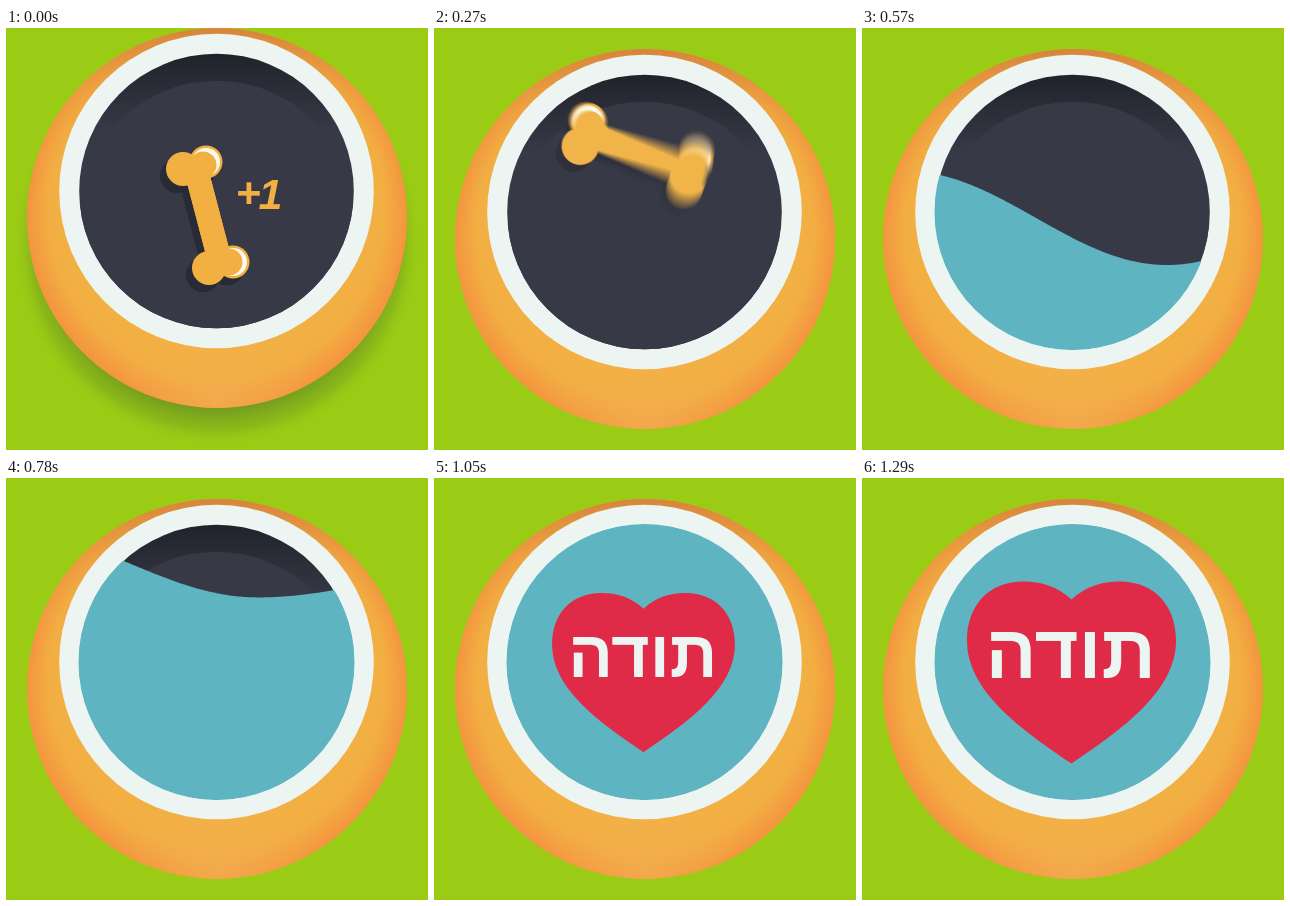
An HTML page with a canvas for the animation above (5040 ms loop, 422 px wide and 422 px high).

```html
<!DOCTYPE html>
<html lang="he">
<head>
<meta charset="utf-8">
<style>
html, body { margin: 0; width: 100%; height: 100%; overflow: hidden; background: #9acb15; }
canvas { display: block; }
</style>
</head>
<body>
<canvas id="stage" width="422" height="422"></canvas>
<script>
const SIZE = 422, LOOP = 5040, STEP = 30, TAU = Math.PI * 2;
const ORANGE = '#f3b042', WHITE = '#edf5f2', TEAL = '#5eb4c1', RED = '#e02b48', DARK = '#373947';
const stage = document.getElementById('stage').getContext('2d');
const layer = () => Object.assign(document.createElement('canvas'), { width: SIZE, height: SIZE }).getContext('2d');
const sample = layer(), blur = layer();

// Piecewise linear value from [time, value] pairs
function track(t, keys) {
  if (t <= keys[0][0]) return keys[0][1];
  for (let i = 1; i < keys.length; i++) {
    const [a, u] = keys[i - 1], [b, v] = keys[i];
    if (t <= b) return u + (v - u) * (t - a) / (b - a);
  }
  return keys[keys.length - 1][1];
}

function disc(c, x, y, r, fill) {
  c.beginPath();
  c.arc(x, y, r, 0, TAU);
  c.fillStyle = fill;
  c.fill();
}

function blend(gradient, ...stops) {
  for (const [at, color] of stops) gradient.addColorStop(at, color);
  return gradient;
}

// Text sized by its ink width and centred on its ink box
function label(text, font, x, y, width, color) {
  const c = stage;
  const setFont = size => { c.font = font.replace('SIZE', size + 'px'); return c.measureText(text); };
  c.textAlign = 'left';
  c.direction = 'ltr';
  const ref = setFont(100);
  const m = setFont(100 * width / (ref.actualBoundingBoxRight + ref.actualBoundingBoxLeft));
  c.fillStyle = color;
  c.fillText(text, x + (m.actualBoundingBoxLeft - m.actualBoundingBoxRight) / 2,
    y + (m.actualBoundingBoxAscent - m.actualBoundingBoxDescent) / 2);
}

function drawButton(y, shade) {
  const c = stage;
  if (shade > 0) {
    c.globalAlpha = shade;
    disc(c, 211, y + 24, 204, blend(c.createRadialGradient(211, y + 24, 166, 211, y + 24, 204),
      [0, 'rgba(112,150,32,.9)'], [.55, 'rgba(125,168,28,.55)'], [1, 'rgba(154,203,21,0)']));
    c.globalAlpha = 1;
  }
  disc(c, 211, y, 190, blend(c.createRadialGradient(211, y - 16, 148, 211, y, 190),
    [0, '#f2b043'], [.5, '#f2ae42'], [1, '#f4943f']));
  disc(c, 211, y, 190, blend(c.createRadialGradient(211, y + 185, 0, 211, y + 185, 115),
    [0, 'rgba(242,176,82,.7)'], [1, 'rgba(242,176,72,0)']));
  disc(c, 211, y, 190, blend(c.createLinearGradient(0, y - 190, 0, y - 40),
    [0, 'rgba(212,132,58,.95)'], [.4, 'rgba(232,158,62,.5)'], [1, 'rgba(242,174,66,0)']));
  disc(c, 210.5, y - 27, 157.3, WHITE);
  disc(c, 210.5, y - 27, 137.3, blend(c.createLinearGradient(0, y - 164, 0, y - 85),
    [0, '#20232a'], [.45, '#2b2e38'], [1, DARK]));
  c.save();
  c.beginPath();
  c.arc(210.5, y - 27, 137.3, 0, TAU);
  c.clip();
  disc(c, 210.5, y, 137.3, DARK);
  c.restore();
}

function boneShape(c, body, shine) {
  c.strokeStyle = body;
  c.lineWidth = 24;
  c.beginPath();
  c.moveTo(-11, -42);
  c.lineTo(11, 42);
  c.stroke();
  for (const [x, y, dx, dy] of [[-2, -53.5, -3, 3], [25, 46.5, -4, 0]]) {
    disc(c, x, y, 16.5, body);
    if (shine) {
      disc(c, x, y, 14, '#fffaf0');
      disc(c, x + dx, y + dy, 13.5, body);
    }
  }
  disc(c, -25, -46.5, 17, body);
  disc(c, 1, 52.5, 17, body);
  if (shine) {
    c.beginPath();
    c.moveTo(-11, -42);
    c.lineTo(11, 42);
    c.stroke();
  }
}

function drawBone(t) {
  const shots = t ? 12 : 1, shutter = 18;
  blur.clearRect(0, 0, SIZE, SIZE);
  blur.globalCompositeOperation = 'lighter';
  blur.globalAlpha = 1 / shots;
  for (let i = 0; i < shots; i++) {
    const at = t + shutter * ((i + .5) / shots - .5);
    const e = t ? Math.pow(at / 270, 2.4) : 0;
    sample.clearRect(0, 0, SIZE, SIZE);
    for (const [dx, dy, color, shine] of [[-6, 7, '#282a35', false], [0, 0, ORANGE, true]]) {
      sample.save();
      sample.translate(202 + 2 * e + dx, 187.5 - 63.5 * e + dy);
      sample.rotate(-56 * e * Math.PI / 180);
      sample.scale(1 + .1 * e, 1 + .1 * e);
      boneShape(sample, color, shine);
      sample.restore();
    }
    blur.drawImage(sample.canvas, 0, 0);
  }
  stage.drawImage(blur.canvas, 0, 0);
}

function drawScore(t) {
  const s = track(t, [[0, 1], [120, 1.13], [240, 0]]);
  if (s <= 0) return;
  const font = 'italic bold SIZE "Liberation Sans", sans-serif';
  stage.save();
  stage.translate(253, 166);
  stage.scale(s, s);
  label('+', font, -10, -1, 22, ORANGE);
  label('1', font, 10.5, 0, 21.5, ORANGE);
  stage.restore();
}

function drawWater(t) {
  const c = stage, x0 = 305 - .252 * (t - 570), y0 = 237 - .56 * (t - 570);
  const left = track(t, [[570, 47], [780, 35], [950, 25]]);
  const right = track(t, [[570, 47], [780, 19], [950, 10]]);
  c.beginPath();
  c.moveTo(70, SIZE);
  for (let x = 70; x <= 352; x += 2) {
    c.lineTo(x, y0 - (x < x0 ? left : right) * (1 - Math.cos(.012 * (x - x0))));
  }
  c.lineTo(352, SIZE);
  c.fillStyle = TEAL;
  c.fill();
}

function drawHeart(t) {
  const s = track(t, [[900, 0], [1050, .875], [1080, 1.05], [1110, 1.2], [1290, 1]]);
  if (s <= 0) return;
  const c = stage;
  c.save();
  c.translate(209.5, 194.5);
  c.scale(s, s);
  c.fillStyle = RED;
  c.beginPath();
  c.moveTo(0, -73);
  for (const k of [-1, 1]) {
    c.moveTo(0, -73);
    c.bezierCurveTo(14 * k, -86, 30 * k, -91, 48 * k, -91);
    c.bezierCurveTo(84 * k, -91, 104.5 * k, -66, 104.5 * k, -32);
    c.bezierCurveTo(104.5 * k, 18, 52 * k, 56, 0, 91);
  }
  c.fill();
  c.fillRect(-.5, -72, 1, 162);
  label('תודה', '800 SIZE "Open Sans", "Liberation Sans", "DejaVu Sans", sans-serif', -1, -17.5, 159, WHITE);
  c.restore();
}

function draw(t) {
  const c = stage;
  const drop = track(t, [[0, 0], [30, 10], [60, 21], [90, 31], [120, 38], [150, 35], [180, 29], [210, 24], [240, 21]]);
  const y = 190 + drop;
  c.fillStyle = '#9acb15';
  c.fillRect(0, 0, SIZE, SIZE);
  drawButton(y, t < 120 ? 1 - t / 120 : 0);
  c.save();
  c.beginPath();
  c.arc(210.5, y - 27, t < 300 ? 137.3 : 138, 0, TAU);
  c.clip();
  if (t < 480) drawBone(t);
  drawScore(t);
  if (t >= 300) drawWater(t);
  drawHeart(t);
  c.restore();
}

function tick(now) {
  draw(Math.min(1290, Math.floor(now % LOOP / STEP) * STEP));
  requestAnimationFrame(tick);
}
draw(0);
const start = performance.now();
requestAnimationFrame(() => tick(0));
requestAnimationFrame(function loop() {
  tick = () => {};
  draw(Math.min(1290, Math.floor((performance.now() - start) % LOOP / STEP) * STEP));
  requestAnimationFrame(loop);
});
</script>
</body>
</html>
```
